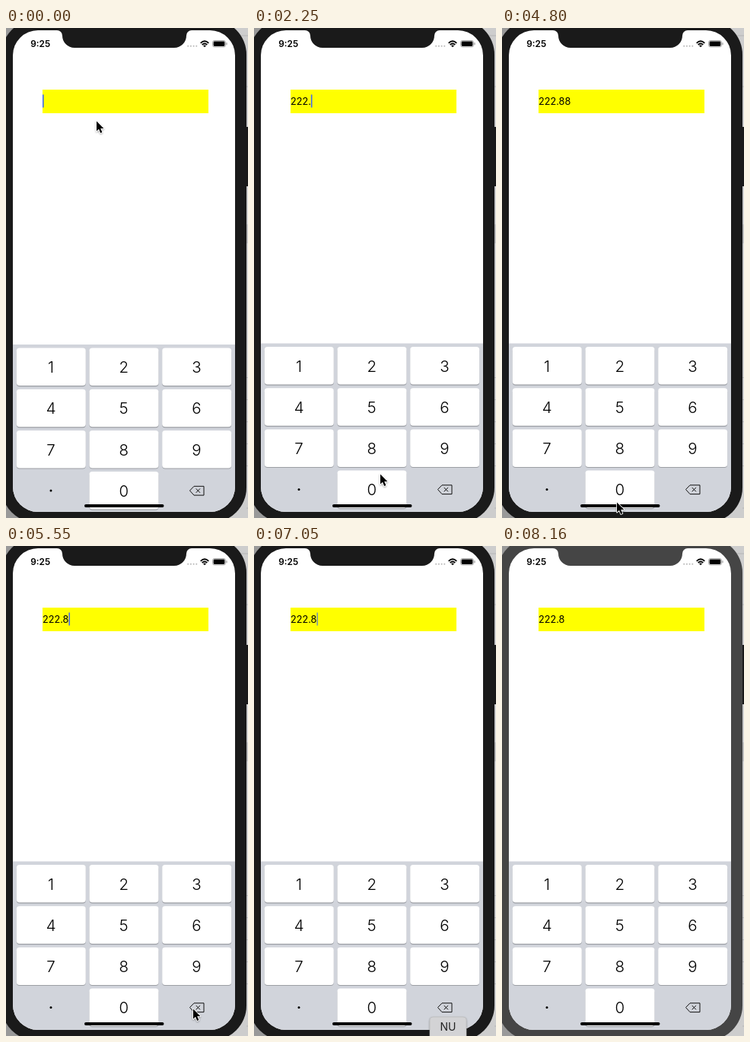
Recreate the animation shown at these times as an HTML page. Size 318x644 px, loop 8260 ms.

```html
<!DOCTYPE html>
<html lang="en">
<head>
<meta charset="utf-8">
<title>Decimal input</title>
<style>
html, body { margin: 0; width: 100%; height: 100%; overflow: hidden; background: #999; }
svg { display: block; width: 318px; height: 644px; font-family: Inter, Roboto, sans-serif; }
</style>
</head>
<body>
<svg viewBox="0 0 318 644">
  <defs>
    <clipPath id="screen"><rect x="9" y="3" width="292" height="633" rx="33"/></clipPath>
    <filter id="shadow" x="-30%" y="-30%" width="160%" height="170%">
      <feDropShadow dx="0" dy="1" stdDeviation="1.2" flood-opacity=".4"/>
    </filter>
  </defs>

  <!-- Window behind the phone -->
  <rect width="318" height="644" fill="#999"/>
  <rect x="280" width="38" height="644" fill="#cdcdcd"/>
  <path d="M300 10H318M316 77H318M316 631H318" stroke="#b4b4b4"/>
  <path d="M317 459V580" stroke="#b4b4b4" stroke-width="2" stroke-dasharray="1 28"/>
  <path d="M310 130H318V208H310Z" fill="#191919"/>
  <path d="M310 258H318V283H310Z" fill="#bdbdbd"/>

  <!-- Phone -->
  <rect id="bezel" x="-6" y="-11" width="322" height="661" rx="46"/>
  <g clip-path="url(#screen)">
    <rect x="9" y="3" width="292" height="633" fill="#fff"/>
    <rect x="48" y="81" width="218" height="31" fill="#ff0"/>
    <text id="value" x="48" y="101" font-size="12.7"></text>
    <rect id="caret" y="87.5" width="1.6" height="17" fill="#426bf2"/>
    <g id="keyboard">
      <rect x="9" y="414.5" width="292" height="230" fill="#d1d4db"/>
      <g id="keys" font-size="20.5" font-weight="300" text-anchor="middle"></g>
      <circle cx="59" cy="606.5" r="1.5"/>
      <path d="M241.5 606.5L247 600.8H260V612.6H247ZM249.7 603.9L255 609.3M255 603.9L249.7 609.3" fill="none" stroke="#111" stroke-linejoin="round"/>
    </g>
    <rect x="103" y="626" width="104.5" height="4" rx="2"/>
  </g>
  <path id="notch" d="M67 2V3A7 7 0 0 1 74 10A16 16 0 0 0 90 26H221A16 16 0 0 0 237 10A7 7 0 0 1 244 3V2Z"/>

  <!-- Status bar -->
  <text x="32.3" y="25" font-size="11.8" font-weight="600">9:25</text>
  <path d="M239.2 23.8H251" stroke="#b8b8b8" stroke-width="2" stroke-linecap="round" stroke-dasharray="0 3.7"/>
  <g fill="none" stroke="#000" stroke-width="1.8">
    <path d="M255.7 19.8Q261 14.8 266.3 19.8M257.7 22Q261 19 264.3 22"/>
    <path d="M259 23.2Q261 21.8 263 23.2L261 25.3Z" fill="#000" stroke="none"/>
    <rect x="271.5" y="16.5" width="17" height="8.5" rx="2.4" stroke="#999" stroke-width=".8"/>
    <path d="M290 19.3V22.3" stroke="#999" stroke-width="1.1"/>
  </g>
  <rect x="272.6" y="17.6" width="14.8" height="6.3" rx="1.3"/>

  <g id="tip">
    <rect x="231" y="619" width="48" height="32" rx="4" fill="#d3d3d5" stroke="#b5b5b7" stroke-width=".6" filter="url(#shadow)"/>
    <text x="255" y="637" font-size="14" text-anchor="middle" fill="#222">NU</text>
  </g>
  <g id="pointer" filter="url(#shadow)">
    <path d="M0 .5V13.6L3 10.8L5.2 16L7.4 15L5.2 9.9H9.4Z" stroke="#fff" stroke-width="1.6" paint-order="stroke" stroke-linejoin="round"/>
  </g>
</svg>
<script>
const LOOP = 8260, STEP = 150, BLUR_AT = 8160;
const $ = id => document.getElementById(id);

// Key presses; '<' deletes
const presses = [
  { at: 450, key: '2' }, { at: 1050, key: '2' }, { at: 1200, key: '2' }, { at: 1950, key: '.' },
  { at: 2700, key: '8' }, { at: 3000, key: '8' }, { at: 5550, key: '<' },
];

// Pointer trips; it rests between them
const start = { x: 119, y: 122 };
const trips = [
  { from: 0, to: 450, x: 163, y: 442 },
  { from: 1350, to: 1500, x: 209, y: 480 },
  { from: 1500, to: 1950, x: 48, y: 605 },
  { from: 1950, to: 2250, x: 166, y: 586 },
  { from: 2250, to: 2550, x: 166, y: 547 },
  { from: 3000, to: 3600, x: 25, y: 624 },
  { from: 4350, to: 4800, x: 151, y: 623 },
  { from: 4800, to: 5250, x: 246, y: 608 },
  { from: 5850, to: 6450, x: 261, y: 278 },
  { from: 6450, to: 6900, x: 255, y: 660 },
];

function drawKeys() {
  for (let i = 0; i < 10; i++) {
    const x = 13.8 + (i < 9 ? i % 3 : 1) * 95.7, y = 419 + Math.floor(i / 3) * 54.2;
    const rect = (dy, fill) => `<rect x="${x}" y="${y + dy}" width="91" height="49.5" rx="4" fill="${fill}"/>`;
    $('keys').innerHTML += rect(1.2, '#9b9ea4') + rect(0, '#fff') +
      `<text x="${x + 45.3}" y="${y + 32.6}">${(i + 1) % 10}</text>`;
  }
}

const ease = k => k * k * (3 - 2 * k);

function pointerAt(t) {
  let { x, y } = start;
  for (const trip of trips) {
    const k = ease(Math.min(1, Math.max(0, (t - trip.from) / (trip.to - trip.from))));
    x += (trip.x - x) * k;
    y += (trip.y - y) * k;
  }
  return [x, y];
}

// The caret stays solid after a press, then fades out and in
function caretAlpha(age) {
  const p = age % 1050;
  return p < 450 ? 1 : p < 600 ? 0.7 : p < 900 ? 0 : 0.05;
}

function draw(t) {
  const blurred = t >= BLUR_AT;
  const q = blurred ? BLUR_AT : Math.floor(Math.min(t, BLUR_AT - STEP) / STEP) * STEP;
  const done = presses.filter(p => p.at <= q);
  const text = done.reduce((s, p) => p.key === '<' ? s.slice(0, -1) : s + p.key, '');
  const lastPress = done.length ? done[done.length - 1].at : 0;
  const value = $('value'), bezel = blurred ? '#454545' : '#1a1a1a';

  value.textContent = text;
  $('caret').setAttribute('x', 48 + (text ? value.getComputedTextLength() : 0));
  $('caret').setAttribute('opacity', blurred ? 0 : caretAlpha(q - lastPress));
  $('keyboard').setAttribute('transform', `translate(0 ${q ? 0 : 1.5})`);
  $('pointer').setAttribute('transform', `translate(${pointerAt(q)})`);
  $('tip').setAttribute('visibility', q >= 6900 && q < 7350 ? 'visible' : 'hidden');
  $('bezel').setAttribute('fill', bezel);
  $('notch').setAttribute('fill', bezel);
}

function tick() {
  draw(performance.now() % LOOP);
  requestAnimationFrame(tick);
}
drawKeys();
tick();
</script>
</body>
</html>
```
